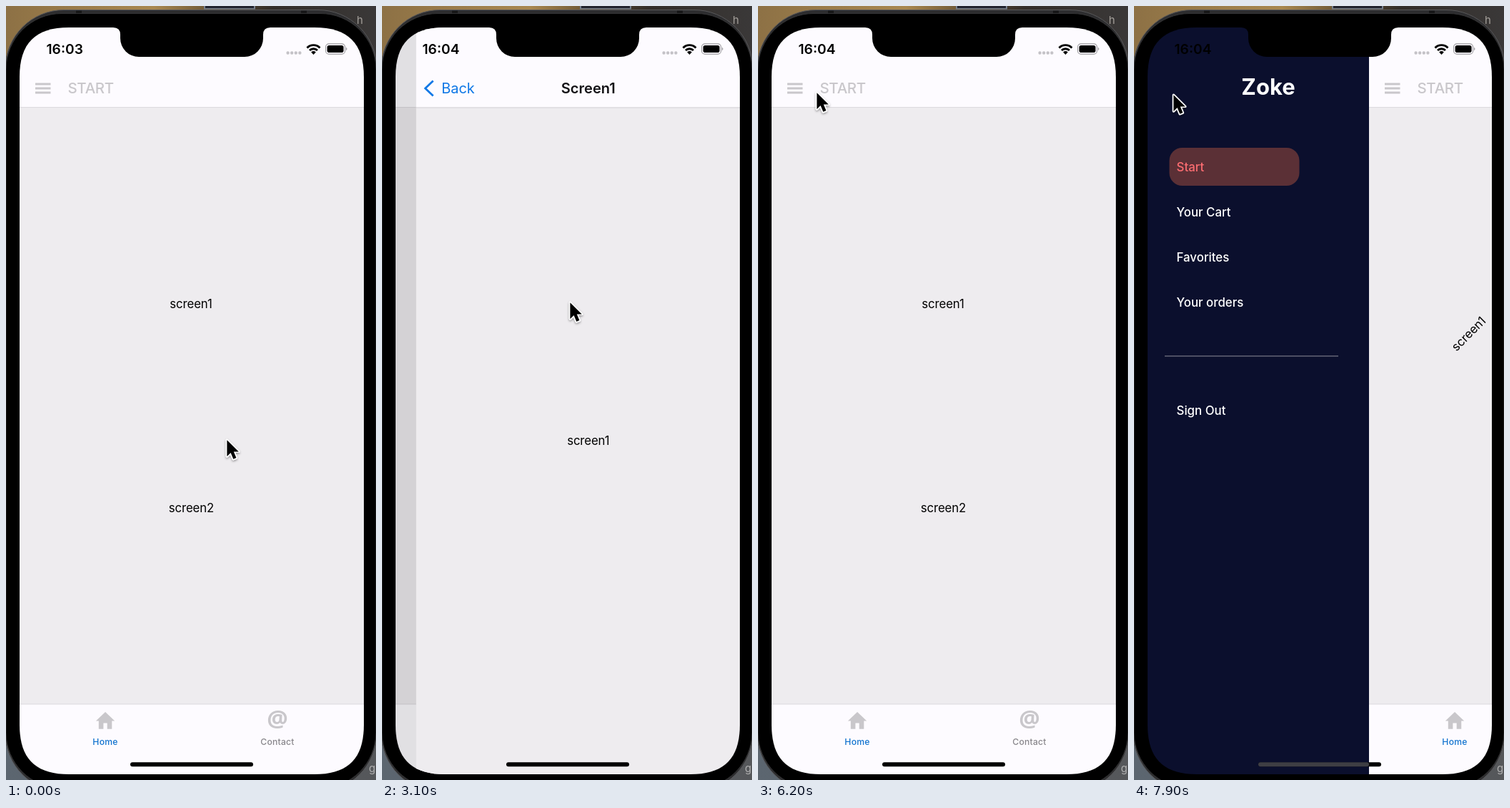
Animation, 518 px wide and 1081 px high, one loop 8000 ms. Source, as an HTML page:

```html
<!DOCTYPE html>
<html lang="en">
<head>
<meta charset="utf-8">
<title>Phone navigation</title>
<style>
  html, body { margin: 0; width: 100%; height: 100%; overflow: hidden; background: #000; }
  svg { display: block; width: 518px; height: 1081px; }
  text { font-family: Inter, Roboto, sans-serif; }
  .mid { text-anchor: middle; }
  .paper { fill: #fdfbff; }
  .page { fill: #eeecef; }
  .rule { fill: #dcdade; }
  .soft { fill: #c9c7cb; }
  .body { font-size: 16.8px; letter-spacing: -.12px; }
  .title { font-size: 20.1px; font-weight: 600; fill: #131216; }
  .tab { font-size: 12.2px; font-weight: 450; letter-spacing: .22px; }
  .item { font-size: 16.85px; font-weight: 500; fill: #fff; }
</style>
</head>
<body>
<svg viewBox="0 0 518 1081">
  <defs>
    <clipPath id="glass"><path d="M19 99C19 52 41 30 88 30H432C479 30 501 52 501 99V1004C501 1051 479 1073 432 1073H88C41 1073 19 1051 19 1004Z"/></clipPath>
    <linearGradient id="desk">
      <stop offset="0" stop-color="#8d7145"/><stop offset=".4" stop-color="#a98850"/>
      <stop offset=".6" stop-color="#5a482d"/><stop offset=".72" stop-color="#332e29"/>
      <stop offset="1" stop-color="#3a3838"/>
    </linearGradient>
    <linearGradient id="floor">
      <stop offset="0" stop-color="#5c6670"/><stop offset="1" stop-color="#55575a"/>
    </linearGradient>
    <filter id="shade" x="-50%" y="-50%" width="200%" height="200%">
      <feDropShadow dx="0" dy="1.5" stdDeviation="1.6" flood-opacity=".4"/>
    </filter>
  </defs>

  <!-- desktop and phone body -->
  <rect width="518" height="540" fill="url(#desk)"/>
  <rect y="540" width="518" height="541" fill="url(#floor)"/>
  <rect x="277" width="72" height="4.5" fill="#77808c"/>
  <rect x="279" width="68" height="3" fill="#22242e"/>
  <text x="491" y="24.5" font-size="15" fill="#a5a19c">h</text>
  <text x="508" y="1070" font-size="15" fill="#b0b0b0">g</text>
  <rect x="-1" y="5.5" width="520" height="1092" rx="82" fill="#2d2d2f" stroke="#58585a"/>
  <path d="M98 6.5h8v4h-8zM413 6.5h8v4h-8z" fill="#171718"/>
  <rect x="0" y="10.5" width="518" height="1082" rx="78" fill="#000" stroke="#3a3a3c" stroke-width=".8"/>

  <g clip-path="url(#glass)">
    <g id="home">
      <rect class="paper" x="19" y="30" width="482" height="112"/>
      <rect class="page" x="19" y="142" width="482" height="833"/>
      <rect class="rule" x="19" y="141" width="482" height="1"/>
      <path id="burger" class="soft" d="M41 107.6h21.5v2.8h-21.5zM41 113.6h21.5v2.8h-21.5zM41 119.6h21.5v2.8h-21.5z"/>
      <text class="soft" x="86.5" y="122" font-size="20.5" font-weight="500" letter-spacing="-.3">START</text>
      <g id="links" class="body mid">
        <text id="link1" x="259" y="422">screen1</text>
        <text x="259.5" y="706.5">screen2</text>
      </g>
      <rect class="paper" x="19" y="975" width="482" height="98"/>
      <rect class="rule" x="19" y="974.5" width="482" height="1"/>
      <path class="soft" transform="translate(123.2 981.8) scale(1.32 1.4)" d="M10 20v-6h4v6h5v-8h3L12 3 2 12h3v8z"/>
      <text class="tab mid" x="139" y="1032" fill="#1273cf">Home</text>
      <text class="soft mid" x="380" y="1007" font-size="33" font-weight="700" style="font-family:'Open Sans','Noto Sans',sans-serif">@</text>
      <text class="tab mid" x="380" y="1032" fill="#88868b">Contact</text>
      <rect id="dim" x="19" y="30" width="482" height="1043"/>
    </g>

    <g id="detail">
      <rect id="edge" x="8" y="142" width="11" height="833"/>
      <rect class="paper" x="19" y="30" width="482" height="112"/>
      <rect class="page" x="19" y="142" width="482" height="931"/>
      <rect x="19" y="141.4" width="482" height="1" fill="#cfcdd1"/>
      <g id="back">
        <path d="M42.8 104.5L31.8 115L42.8 125.5" fill="none" stroke="#0f78e6" stroke-width="2.8"/>
        <text x="54.5" y="122" font-size="20" fill="#0f78e6" letter-spacing="-.1">Back</text>
      </g>
      <text class="title mid" x="260" y="122">Screen1</text>
      <text class="body mid" x="260" y="613">screen1</text>
    </g>

    <g id="drawer">
      <rect x="-40" y="30" width="369" height="1043" fill="#0b0f2d"/>
      <text class="mid" x="188" y="123.5" font-size="31" font-weight="700" fill="#fff">Zoke</text>
      <rect x="49.5" y="198" width="182" height="53" rx="18" fill="#5b3036"/>
      <text class="item" x="59.5" y="231" style="fill:#fa6c70">Start</text>
      <text class="item" x="59.5" y="293.5">Your Cart</text>
      <text class="item" x="59.5" y="357">Favorites</text>
      <text class="item" x="59.5" y="420">Your orders</text>
      <rect x="43" y="488.4" width="243" height="1.1" fill="#83848f"/>
      <text class="item" x="59.5" y="570.5">Sign Out</text>
    </g>
  </g>

  <!-- notch, status bar, home indicator -->
  <path d="M150 28V30Q160 30 160 40V45A26 26 0 0 0 186 71H334A26 26 0 0 0 360 45V40Q360 30 370 30V28Z"/>
  <text id="clock" x="56.5" y="67.3" font-size="19.2" font-weight="600">16:03</text>
  <path d="M394.6 65.5H412" stroke="#c4c2c7" stroke-width="4.4" stroke-linecap="round" stroke-dasharray="0 5.6"/>
  <g fill="none" stroke="#000" stroke-width="2.9">
    <path d="M421.5 58.4A12.6 12.6 0 0 1 439.5 58.4M425 62A7.8 7.8 0 0 1 436 62"/>
    <path d="M430.5 68L427.2 64.4A4.6 4.6 0 0 1 433.8 64.4Z" fill="#000" stroke="none"/>
  </g>
  <rect x="447.6" y="52.9" width="27" height="14.2" rx="4.4" fill="none" stroke="#9b999e" stroke-width="1.1"/>
  <rect x="449.6" y="54.9" width="23" height="10.2" rx="2.8"/>
  <path d="M476 57.6Q479 60 476 62.4Z" fill="#9b999e"/>
  <rect x="174" y="1056.2" width="172" height="6" rx="3"/>
  <rect id="grip" x="174" y="1056.2" width="0" height="6" rx="3" fill="#3e3e44"/>

  <g id="cursor" filter="url(#shade)">
    <path d="M1.4 2.2V25L6.6 20L10.3 28.8L14.4 27.1L10.8 18.4H17.8Z" stroke="#fff" stroke-width="3.4" stroke-linejoin="round" paint-order="stroke"/>
  </g>
</svg>

<script>
  const LOOP = 8000, STEP = 100, WIDTH = 482, OPEN = 315;
  const el = id => document.getElementById(id);
  const move = (id, x, y = 0) => el(id).setAttribute('transform', `translate(${x} ${y})`);
  const fade = (id, value) => el(id).setAttribute('opacity', value);

  // Critically damped spring from 0 to 1; times in ms, rate per second.
  function spring(t, start, rate) {
    const k = Math.max(0, t - start) / 1000 * rate;
    return 1 - (1 + k) * Math.exp(-k);
  }

  // Eased value between keys of the form [time, value, ...].
  function track(t, keys, i = 1) {
    const next = keys.findIndex(key => key[0] > t);
    if (next === 0) return keys[0][i];
    if (next < 0) return keys[keys.length - 1][i];
    const a = keys[next - 1], b = keys[next];
    const u = (t - a[0]) / (b[0] - a[0]);
    return a[i] + (b[i] - a[i]) * u * u * (3 - 2 * u);
  }

  const pointer = [
    [800, 308, 604], [2400, 262, 412], [3400, 262, 412], [4300, 77, 110],
    [4900, 77, 110], [5400, 84, 126], [5600, 83, 125], [5900, 83, 125],
    [6200, 81, 119], [7300, 50, 112], [7600, 50, 112], [7900, 54, 122]
  ];
  const linkPress = [[2500, 1], [2700, .2], [2800, .2], [2900, .37], [3100, 1]];
  const backPress = [[4500, 1], [4700, .2], [4800, .23], [5100, 1]];
  const burgerPress = [[7400, 1], [7500, .2], [7600, .2], [7900, 1]];

  function draw(t) {
    const pushed = spring(t, 2860.5, 18.9) - spring(t, 4765, 18.9);
    const opened = spring(t, 7655, 25);
    const shift = Math.round(OPEN * opened);

    move('home', shift - .3 * WIDTH * pushed);
    move('detail', WIDTH * (1 - pushed) + (pushed < .001 ? 20 : 0));
    move('drawer', shift - 310);
    el('links').setAttribute('transform', `rotate(${-45.7 * opened} 259 558.5)`);
    // The indicator lightens where the dark drawer lies beneath it.
    el('grip').setAttribute('width', Math.max(0, Math.min(172, shift - 155)));
    fade('dim', .115 * pushed);
    fade('edge', .02 * (1 - pushed));
    fade('link1', track(t, linkPress));
    fade('back', track(t, backPress));
    fade('burger', track(t, burgerPress));
    move('cursor', track(t, pointer), track(t, pointer, 2));
    el('clock').textContent = t < 2000 ? '16:03' : '16:04';
  }

  function frame() {
    const t = performance.now() % LOOP;
    draw(Math.floor(t / STEP) * STEP);
    requestAnimationFrame(frame);
  }
  frame();
</script>
</body>
</html>
```
